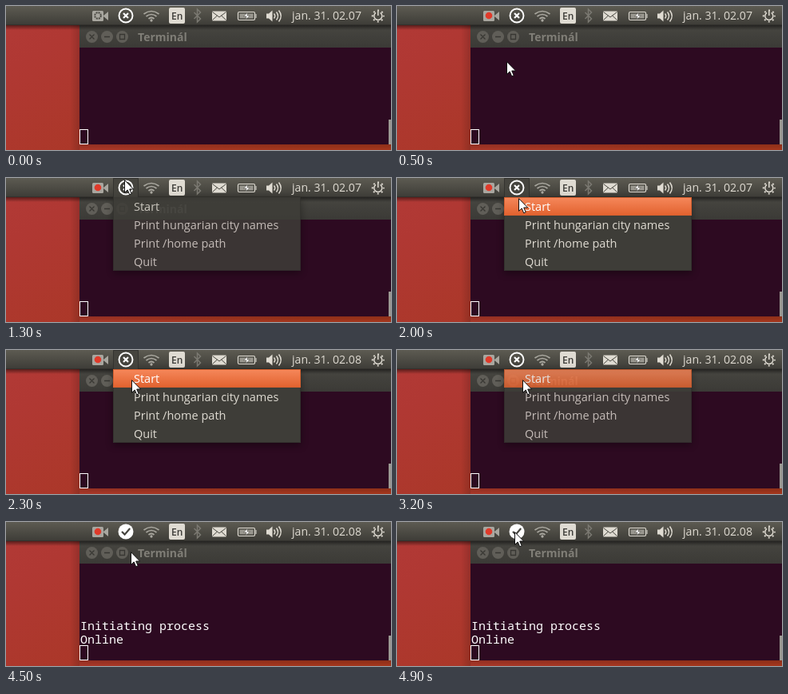
These frames come from a looping animation (482x180 px, 5 s). An HTML page:

```html
<!DOCTYPE html>
<html lang="hu">
<head>
<meta charset="utf-8">
<title>Indicator menu</title>
<style>
  html, body { margin: 0; width: 100%; height: 100%; overflow: hidden; background: #b13935; }
  svg { display: block; }
  text { font: 500 14.5px "Open Sans", sans-serif; white-space: pre; }
  #clock { font-size: 14.1px; fill: #dfdbd2; }
  .title { font-size: 14px; font-weight: 700; fill: #807e77; }
  .lang { font-size: 12px; font-weight: 600; fill: #3c3b37; }
  .term text { font: 500 15px "Noto Sans Mono", monospace; fill: #fff; }
  #menu { filter: drop-shadow(0 3px 5px rgba(0, 0, 0, .4)); }
  #menu text { fill: #dfdbd2; }
  .line { fill: none; stroke: #dfdbd2; stroke-width: 1.5; }
</style>
</head>
<body>
<svg width="482" height="180" viewBox="0 0 482 180">
  <defs>
    <linearGradient id="desk" x2="1" y2=".6">
      <stop stop-color="#b23a37"/><stop offset=".2" stop-color="#b03833"/><stop offset="1" stop-color="#a5371d"/>
    </linearGradient>
    <linearGradient id="panel" x2="0" y2="1">
      <stop stop-color="#5d5b52"/><stop offset="1" stop-color="#3d3c37"/>
    </linearGradient>
    <linearGradient id="bar" x2="0" y2="1">
      <stop stop-color="#474641"/><stop offset="1" stop-color="#3b3a36"/>
    </linearGradient>
    <linearGradient id="hot" x2="0" y2="1">
      <stop stop-color="#f5875a"/><stop offset="1" stop-color="#e2622f"/>
    </linearGradient>
    <linearGradient id="shade" x2="0" y2="1">
      <stop stop-opacity=".5"/><stop offset="1" stop-opacity="0"/>
    </linearGradient>
    <linearGradient id="side">
      <stop stop-opacity="0"/><stop offset="1" stop-opacity=".15"/>
    </linearGradient>
  </defs>

  <rect width="482" height="180" fill="url(#desk)"/>
  <rect x="80" y="24" width="12" height="156" fill="url(#side)"/>
  <rect x="92" y="173" width="390" height="7" fill="url(#shade)" opacity=".3"/>

  <rect x="92" y="25" width="390" height="148" fill="#2d0a21"/>
  <rect x="92" y="24" width="390" height="28" fill="url(#bar)"/>
  <g fill="#605e58">
    <circle cx="107.5" cy="38.5" r="7.5"/><circle cx="126.500" cy="38.5" r="7.5"/><circle cx="145.5" cy="38.5" r="7.5"/>
    <path d="M104.500 35.500l6 6m0-6l-6 6M123 38.500h7M142.500 35.500h6v6h-6z" fill="none" stroke="#383733" stroke-width="1.3"/>
  </g>
  <text class="title" x="165" y="44">Terminál</text>
  <rect x="479" y="142" width="3" height="31" fill="#9b9892"/>
  <g class="term">
    <g id="output"><text x="93" y="135">Initiating process</text><text x="93" y="152">Online</text></g>
    <rect x="92.500" y="154.500" width="10" height="18" fill="none" stroke="#fff"/>
  </g>
  <rect y="24" width="482" height="6" fill="url(#shade)"/>

  <rect width="482" height="24" fill="url(#panel)"/>
  <rect y="23" width="482" height="1" fill="#33322e"/>
  <g id="slot">
    <rect x="134" width="32" height="24" fill="#45443e"/>
    <path d="M134.500 24V.5h31V24" fill="none" stroke="#34332f"/>
  </g>

  <g fill="#a8a69f">
    <rect x="108" y="6" width="14" height="13" rx="1.500"/><path d="M121.500 12.500l6.500-5.500v11z"/>
  </g>
  <circle id="rec" cx="115" cy="12" r="4.300" fill="#e03a2a"/>
  <g id="idle">
    <circle cx="115" cy="12" r="3.800" fill="none" stroke="#4a4942" stroke-width="2" stroke-dasharray="2 1"/>
  </g>

  <g id="off" fill="none" stroke="#fff" stroke-width="1.900">
    <circle cx="150" cy="12" r="8.500"/><path d="M147 9l6 6m0-6l-6 6" stroke-width="2.200"/>
  </g>
  <g id="on">
    <circle cx="150" cy="12" r="9.500" fill="#fff"/>
    <path d="M145 12l3.600 3.600 6.600-7.600" fill="none" stroke="#45443e" stroke-width="2.200"/>
  </g>

  <g fill="none" stroke="#a9a79f" stroke-width="1.700">
    <path d="M172.500 10q9.500-7 19 0"/><path d="M175.500 13q6.500-5 13 0"/><path d="M178.500 16q3.500-3 7 0"/>
    <circle cx="182" cy="18" r=".8"/>
  </g>
  <rect x="204" y="2" width="20" height="20" rx="2" fill="#dfdbd2"/>
  <text class="lang" x="207" y="17">En</text>
  <path class="line" style="stroke:#7b7972" d="M235.500 8l8 8-4 4V4l4 4-8 8"/>
  <rect x="258" y="6.500" width="18" height="12" rx="1" fill="#dfdbd2"/>
  <path d="M258.500 7.500l8.500 6.500 8.500-6.500M258.500 17.500l6-5.500m11 5.500l-6-5.500" fill="none" stroke="#4a4942"/>
  <rect class="line" x="290.500" y="7.500" width="21" height="10" rx="1.500" style="stroke-width:1.200"/>
  <path d="M312 10h2v5h-2zM292.500 9.500h17v6h-17z" fill="#98968e"/>
  <path d="M302.500 8l-5 5h3.500l-1 4 5.500-5h-3.500z" fill="#fff" stroke="#4a4942" stroke-width=".6"/>
  <path d="M326 9.500h3l4.500-4v14l-4.500-4h-3z" fill="#dfdbd2"/>
  <path class="line" d="M335.500 9.500q2.500 3 0 6M338.500 7.500q4 5 0 10M341.500 5.500q5.500 7 0 14"/>
  <text id="clock" x="358" y="17"></text>
  <g class="line">
    <path d="M463 8.300a5 5 0 1 0 5.600 0M465.800 5.500v6.500" stroke-width="1.500"/>
    <circle cx="465.800" cy="12.500" r="7" stroke-width="2" stroke-dasharray="1.900 3.598" stroke-dashoffset=".95"/>
  </g>

  <g id="menu">
    <rect x="134" y="24" width="235" height="92" fill="#3e3d38"/>
    <path d="M134.500 24v91.500h234V24" fill="none" stroke="#33322e"/>
    <rect id="pick" x="134.500" y="24.500" width="234" height="22" fill="url(#hot)" stroke="#d5602f"/>
    <text id="start" x="160" y="41">Start</text>
    <text x="160" y="64">Print hungarian city names</text>
    <text x="160" y="87">Print /home path</text>
    <text x="160" y="110">Quit</text>
  </g>

  <path id="mouse" d="M.5.7V16.300L4.200 12.900l2.500 5.900 2.500-1.100-2.500-5.700H11.600z" fill="#fff" stroke="#111"/>
</svg>
<script>
  const $ = id => document.getElementById(id);
  const LOOP = 5000, TICK = 100;

  // Pointer tip: [ms, x, y], held until the next entry.
  const path = [
    [300, 134, 113], [400, 135, 96], [500, 137, 69], [600, 141, 39], [700, 145, 15], [800, 148, 3], [900, 148, 2],
    [1900, 149, 7], [2000, 152, 25], [2100, 155, 40], [2200, 156, 43], [2300, 157, 37],
    [4500, 156, 37], [4700, 164, 33], [4800, 157, 20], [4900, 147, 12]
  ];

  const show = (id, on) => $(id).style.display = on ? "" : "none";

  function menuOpacity(t) {
    if (t < 1300 || t >= 3300) return 0;
    if (t < 1400 || t >= 3200) return 0.85;
    return t < 1500 ? 0.95 : 1;
  }

  function draw(now) {
    const t = Math.floor(now % LOOP / TICK) * TICK;
    const online = t >= 3300;
    const spot = path.filter(p => p[0] <= t).pop();

    show("idle", t < 100);
    show("rec", t >= 100);
    show("off", !online);
    show("on", online);
    show("output", online);
    show("slot", t >= 1300 && t < 3200);
    show("pick", t >= 2000);
    $("start").style.fill = t >= 2000 ? "#fff" : "";
    $("menu").style.opacity = menuOpacity(t);
    $("clock").textContent = t < 2100 ? "jan. 31. 02.07" : "jan. 31. 02.08";

    show("mouse", spot);
    if (spot) $("mouse").setAttribute("transform", `translate(${spot[1]} ${spot[2]})`);
  }

  const begin = performance.now();
  (function loop() {
    draw(performance.now() - begin);
    requestAnimationFrame(loop);
  })();
</script>
</body>
</html>
```
